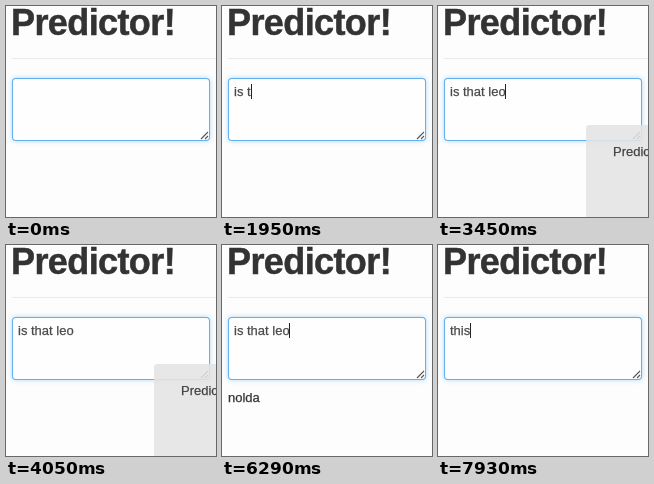
An HTML page that plays this animation: 210x211 px, repeating every 8000 ms.

```html
<!DOCTYPE html>
<html lang="en">
<head>
<meta charset="utf-8">
<title>Predictor</title>
<style>
  html, body { margin: 0; width: 100%; height: 100%; overflow: hidden; background: #fdfdfd; }
  svg { position: absolute; left: 0; top: 0; }
  text {
    font: 13px "Liberation Sans", Arial, sans-serif; white-space: pre;
    fill: #333; stroke: #333; stroke-width: .25px;
  }
  .title { font-size: 36px; font-weight: bold; letter-spacing: -.6px; stroke-width: .5px; }
  .field {
    position: absolute; left: 6px; top: 72px; width: 198px; height: 63px;
    box-sizing: border-box; background: #fefefe;
    border: 1px solid rgba(82, 168, 236, .9); border-radius: 4px;
    box-shadow: 0 0 5px rgba(82, 168, 236, .45);
  }
  #typed { fill: #4a4a4a; stroke: #4a4a4a; }
  #notice { opacity: .87; }
</style>
</head>
<body>
<div class="field"></div>
<svg width="210" height="211" viewBox="0 0 210 211">
  <text class="title" x="5" y="29">Predictor!</text>
  <rect x="6" y="52" width="204" height="1" fill="#eaeaea"/>
  <path d="M195 133l7-7M199 133l3-3" stroke="#555" stroke-width="1.1" fill="none"/>
  <rect id="selection" x="12" y="78" width="55" height="15" fill="#b3d7fe"/>
  <text id="typed" x="12" y="90"></text>
  <rect id="caret" y="78" width="1" fill="#222"/>
  <text id="answer" x="6" y="157">nolda</text>
  <g id="notice">
    <rect x="148" y="119" width="80" height="110" rx="3" fill="#e4e4e4"/>
    <text x="175" y="150" style="fill:#222">Predicting...</text>
  </g>
</svg>
<script>
const LOOP = 8000;
const $ = id => document.getElementById(id);
const show = (id, on) => $(id).setAttribute("visibility", on ? "visible" : "hidden");

// [start ms, typed text, caret x]
const typing = [
  [0, "", 12],
  [1500, "is", 21],
  [1650, "is ", 25],
  [1950, "is t", 29],
  [2100, "is th", 36],
  [2250, "is that", 46],
  [2400, "is that ", 50],
  [2550, "is that le", 60],
  [2700, "is that leo", 67],
  [6880, "", 12],
  [7780, "th", 23],
  [7930, "this", 32]
];

// The caret toggles at each of these times, starting hidden.
const blinks = [150, 600, 1200, 3150, 3450, 4050, 4200, 4650, 5240, 5690, 6290, 6440, 6880];

const within = (t, from, to) => t >= from && t < to;

function render(t) {
  const [, text, x] = typing.filter(step => step[0] <= t).pop();
  if ($("typed").textContent !== text) $("typed").textContent = text;
  $("caret").setAttribute("x", x);
  $("caret").setAttribute("height", text ? 15 : 16);
  show("caret", blinks.filter(b => b <= t).length % 2);
  show("selection", within(t, 6440, 6880));
  show("notice", within(t, 3450, 4200));
  show("answer", within(t, 4200, 7330));
}

const start = performance.now();
function tick() {
  render((performance.now() - start) % LOOP);
  requestAnimationFrame(tick);
}
tick();
</script>
</body>
</html>
```
